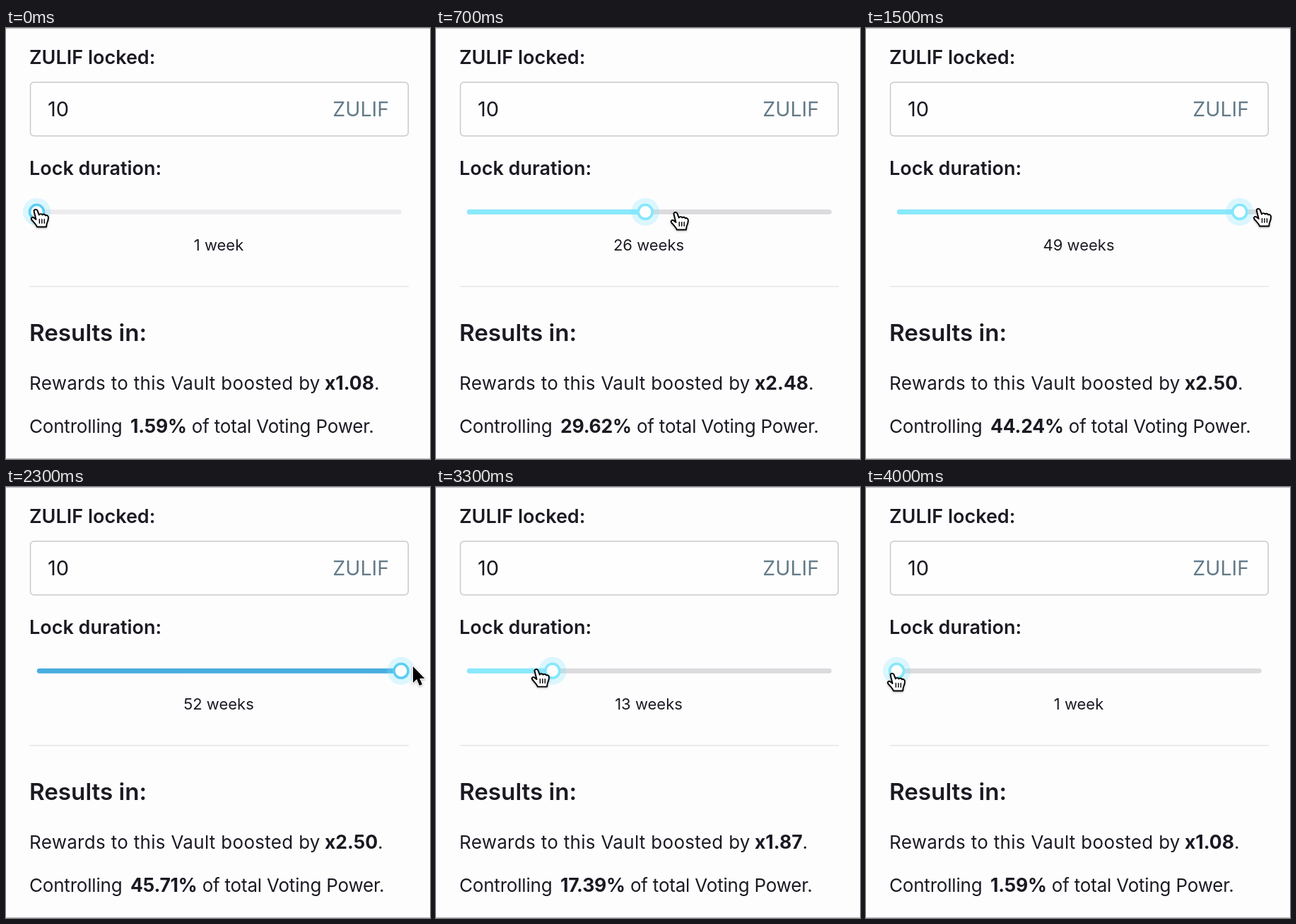
Write an HTML page that moves like this. It is 600 px wide and 610 px high and loops after 4100 ms.

```html
<!DOCTYPE html>
<html lang="en">
<head>
<meta charset="utf-8">
<title>Lock duration</title>
<style>
  html, body { margin: 0; width: 100%; height: 100%; overflow: hidden; background: #fefdfe; }
  svg { display: block; width: 600px; height: 610px; }
  text { font: 400 26px Inter, "Open Sans", sans-serif; fill: #1b1a22; white-space: pre; }
  .label { font-weight: 600; font-size: 27px; }
  .title { font-weight: 600; font-size: 33.2px; }
  .field { font-size: 29px; }
  .unit { font-size: 28.5px; fill: #647b89; text-anchor: end; }
  .weeks { font-size: 22px; text-anchor: middle; }
  .loose { letter-spacing: .3px; }
  .tight { letter-spacing: -.2px; }
  .num { font-weight: 700; font-size: 26.5px; }
  .rail { stroke-width: 7; stroke-linecap: round; }
  .cursor { filter: drop-shadow(0 1.5px 1.5px rgba(0, 0, 0, .3)); }
</style>
</head>
<body>
<svg viewBox="0 0 600 610">
  <rect width="600" height="610" fill="#fefdfe"/>
  <path d="M0 .5H600M0 609.5H600" stroke="#b9b9bb"/>

  <text class="label" x="33" y="50.5">ZULIF locked:</text>
  <rect x="34.5" y="76.8" width="534.7" height="76" rx="5" fill="#fefefe" stroke="#c9c9cd" stroke-width="1.5"/>
  <text class="field" x="59" y="125.3">10</text>
  <text class="unit" x="542" y="125.3">ZULIF</text>

  <text class="label" x="33" y="208">Lock duration:</text>
  <line id="rail" class="rail" x1="47.3" x2="556.3" y1="260.3" y2="260.3"/>
  <line id="fill" class="rail" x1="47.3" y1="260.3" y2="260.3"/>
  <g id="handle">
    <circle r="19.7" fill="#7de2fa" opacity=".27"/>
    <circle id="knob" r="10" fill="#fff" stroke-width="3.6"/>
  </g>
  <text id="weeks" class="weeks" x="301" y="314.7"></text>
  <path d="M33.5 365.8H570" stroke="#e6e6ea" stroke-width="1.6"/>

  <text class="title" x="33" y="443">Results in:</text>
  <text class="loose" x="33" y="512">Rewards to this Vault boosted by</text>
  <text x="451" y="512"><tspan id="boost" class="num"></tspan><tspan>.</tspan></text>
  <text class="tight" x="33" y="573">Controlling</text>
  <text class="tight" x="176" y="573"><tspan id="power" class="num"></tspan><tspan> of total Voting Power.</tspan></text>

  <g id="hand" class="cursor" stroke="#000" stroke-linejoin="round" stroke-linecap="round">
    <g transform="scale(.94)">
      <path fill="#fff" stroke-width="2" d="M-3.5 3C-4.5-.3 .2-1.3 1.5 1.5L4 8C5 6 8 6 9 8C10.5 6.5 13 7 14 9C15.5 8 18 9 18 12C18 17 16 19 15.5 22L15 26H1C0 23-4 19-7 15.5C-9 12.5-6 10.5-3.5 12.5L-.5 15Z"/>
      <path fill="none" stroke-width="1.5" d="M4.6 14.5v6M8.3 14.5v6M12 14.5v6"/>
    </g>
  </g>
  <path id="arrow" class="cursor" stroke="#fff" stroke-width="2" paint-order="stroke" d="M0 0V23L5.3 18L9 27L13 25.3L9.3 17H16.5Z"/>
</svg>
<script>
const LOOP = 4100, STEP = 100, LAG = 120;
const LEFT = 43.5, PER_WEEK = 10.11, MAX_WEEKS = 52;
const REST = 1600, RETURN = 2900, FADE = 300;

// Pointer turning points: time, x, y
const path = [
  [0, 43, 257], [280, 204, 261], [1000, 437, 261], [1600, 580, 255],
  [2300, 576, 254], [2680, 336, 240], [3180, 164, 257], [3900, 38, 264]
];

const $ = id => document.getElementById(id);
const clamp = (v, lo, hi) => Math.min(hi, Math.max(lo, v));
const lerp = (a, b, k) => a + (b - a) * k;
const ramp = (t, from, span) => clamp((t - from) / span, 0, 1);
const mix = (a, b, k) => `rgb(${a.map((c, i) => Math.round(lerp(c, b[i], k)))})`;
const move = (el, x, y) => el.setAttribute('transform', `translate(${x} ${y})`);

function pointer(t) {
  const i = Math.max(1, path.findIndex(p => p[0] >= t));
  const last = path[path.length - 1];
  if (t >= last[0]) return last.slice(1);
  const [t0, x0, y0] = path[i - 1], [t1, x1, y1] = path[i];
  const k = ramp(t, t0, t1 - t0);
  return [lerp(x0, x1, k), lerp(y0, y1, k)];
}

function render(time) {
  const t = Math.floor(time % LOOP / STEP) * STEP;
  const [dragX] = pointer(t - LAG);
  const weeks = clamp(Math.round((dragX - LEFT) / PER_WEEK) + 1, 1, MAX_WEEKS);
  const x = LEFT + (weeks - 1) * PER_WEEK;
  const share = weeks / (weeks + 61.77);
  const hover = ramp(t, 0, FADE) - ramp(t, REST, FADE) + ramp(t, RETURN, FADE);

  $('rail').setAttribute('stroke', mix([236, 236, 239], [219, 219, 222], hover));
  $('fill').setAttribute('stroke', mix([71, 174, 223], [136, 233, 252], hover));
  $('fill').setAttribute('x2', Math.max(47.4, x));
  $('knob').setAttribute('stroke', mix([93, 206, 242], [133, 231, 251], hover));
  move($('handle'), x, 260.3);

  $('weeks').textContent = weeks + (weeks === 1 ? ' week' : ' weeks');
  $('boost').textContent = 'x' + Math.min(2.5, 1 + 5 * share).toFixed(2);
  $('power').textContent = (share * 100).toFixed(2) + '%';

  const isArrow = t >= REST && t < RETURN;
  $('arrow').style.display = isArrow ? '' : 'none';
  $('hand').style.display = isArrow ? 'none' : '';
  move(isArrow ? $('arrow') : $('hand'), ...pointer(t));
}

const start = performance.now();
function frame() {
  render(performance.now() - start);
  requestAnimationFrame(frame);
}
frame();
</script>
</body>
</html>
```
